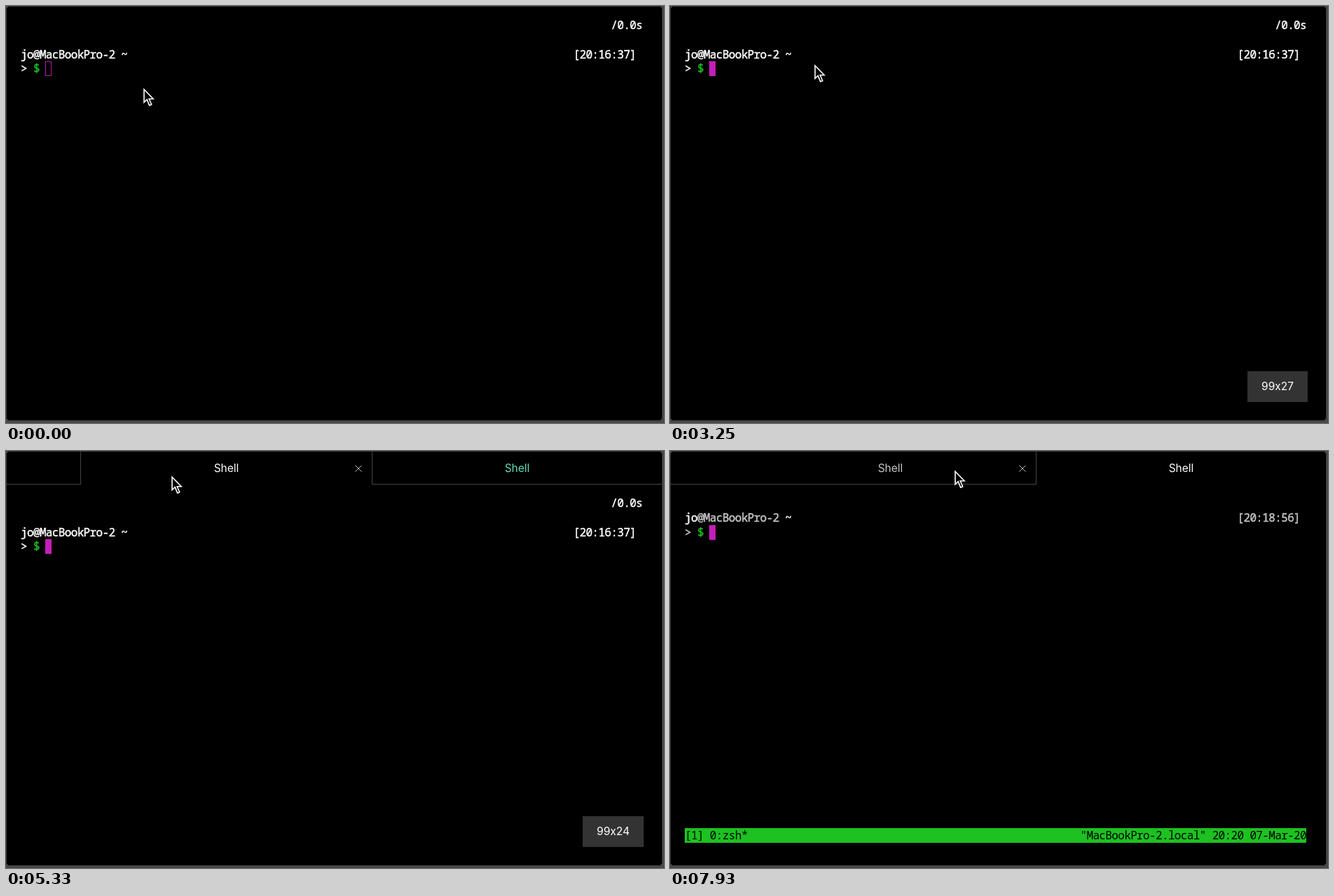
Write an HTML page that moves like this. It is 939 by 596 pixels and loops after 8000 ms.

```html
<!DOCTYPE html>
<html lang="en">
<head>
<meta charset="utf-8">
<title>Terminal tabs</title>
<style>
  html, body { margin: 0; width: 100%; height: 100%; overflow: hidden; background: #484848; }
  #stage { position: relative; width: 939px; height: 596px; overflow: hidden; }
  #stage div, #stage span, #stage svg { position: absolute; white-space: pre; }
  #window {
    left: 0; top: 0; width: 937px; height: 593px; box-sizing: border-box;
    background: #000; border: 1px solid #3c3c3c; border-radius: 5px;
  }
  .screen {
    left: 21px; top: 17px; width: 887px; height: 558px;
    font: 400 16px/20.75px "Noto Sans Mono", "DejaVu Sans Mono", monospace;
    letter-spacing: -.64px; -webkit-text-stroke: .45px currentColor; color: #fff;
  }
  .shifted { top: 64px; }
  .grey { color: #c7c7c7; }
  .green { color: #1dc121; }
  .block {
    width: 9px; height: 21px; box-sizing: border-box;
    border: 1px solid #c51eba; background: #c51eba;
  }
  .hollow { background: none; border-color: #b01ba6; }
  .status { left: 0; top: 475px; width: 887px; height: 21px; background: #1dc121; }
  .status span { color: #000; -webkit-text-stroke: 0; }

  #tabs { left: 0; top: 0; width: 937px; height: 48px; font: 15.5px/49px Inter, Roboto, sans-serif; }
  .label { top: 0; width: 415px; text-align: center; color: #fff; }
  .rule { background: #444; }
  .across { top: 47px; height: 1px; }
  .upright { top: 1px; width: 1px; height: 47px; }
  .close { top: 20px; width: 10px; height: 10px; stroke: #bbb; fill: none; }

  #notice {
    right: 29px; top: 522px; height: 44px; padding: 0 20px; background: #333; color: #fff;
    font: 15.5px/44px Inter, Roboto, sans-serif;
  }
  #pointer { left: 0; top: 0; width: 17px; height: 27px; overflow: visible; }
</style>
</head>
<body>
<div id="stage">
  <div id="window"></div>
  <div id="shell" class="screen"></div>
  <div id="tmux" class="screen shifted"><div class="status"></div></div>
  <div id="tabs">
    <div class="rule across" id="lineA" style="left:1px"></div>
    <div class="rule upright" id="edge" style="left:106px"></div>
    <div class="rule upright" style="left:522px"></div>
    <div class="rule across" id="lineB" style="left:522px;width:414px"></div>
    <div class="label" id="first" style="left:107px">Shell</div>
    <div class="label" id="second" style="left:522px">Shell</div>
    <svg class="close" id="closeA" style="left:498px"><path d="M.5.5l9 9m0-9l-9 9"/></svg>
    <svg class="close" id="closeB" style="left:912px"><path d="M.5.5l9 9m0-9l-9 9"/></svg>
  </div>
  <div id="notice"></div>
  <svg id="pointer"><path d="M1 1.2V19.6l4.2-3.9 3.5 8.4 3-1.3-3.5-8.1h5.9z"
    fill="#000" stroke="#fff" stroke-width="1.6"/></svg>
</div>
<script>
  const LOOP = 8000, STEP = 130, CELL = 8.96, ROW = 20.75;
  const $ = id => document.getElementById(id);

  function put(screen, col, row, text, style = "") {
    const el = document.createElement("span");
    el.textContent = text;
    el.className = style;
    el.style.left = col * CELL + "px";
    el.style.top = Math.round(row * ROW) + "px";
    screen.append(el);
    return el;
  }

  const shell = $("shell"), tmux = $("tmux");
  put(shell, 94, 0, "/0.0s");
  put(shell, 0, 2, "jo@MacBookPro-2 ~");
  put(shell, 88, 2, "[20:16:37]");
  put(shell, 0, 3, ">");
  put(shell, 2, 3, "$", "green");
  const block = put(shell, 3.93, 3, "", "block");

  put(tmux, 0, 1, "jo");
  put(tmux, 2, 1, "@MacBookPro-2", "grey");
  put(tmux, 16, 1, "~");
  put(tmux, 88, 1, "[20:18:56]", "grey");
  put(tmux, 0, 2, ">", "grey");
  put(tmux, 2, 2, "$", "green");
  put(tmux, 3.93, 2, "", "block");
  const status = tmux.querySelector(".status");
  put(status, 0, 0, "[1] 0:zsh*");
  put(status, 63, 0, '"MacBookPro-2.local" 20:20 07-Mar-20');

  // Pointer path: time, x, y
  const path = [
    [0, 196, 118], [1690, 196, 118], [2210, 186, 62], [2600, 177, 34], [2860, 181, 37],
    [3250, 206, 84], [3510, 216, 118], [4030, 216, 118], [4550, 222, 86], [4810, 227, 56],
    [4940, 228, 52], [5070, 231, 44], [5330, 236, 36], [5980, 236, 36], [6110, 385, 34],
    [6240, 538, 29], [6370, 600, 28], [6500, 628, 28], [7020, 633, 28], [7150, 622, 28],
    [7410, 518, 28], [7670, 424, 28], [7800, 409, 28], [7930, 406, 28]
  ];

  function pointerAt(t) {
    const i = path.findIndex(p => p[0] >= t);
    if (i < 1) return path[0].slice(1);
    const [t0, x0, y0] = path[i - 1], [t1, x1, y1] = path[i];
    const k = (t - t0) / (t1 - t0);
    return [x0 + (x1 - x0) * k, y0 + (y1 - y0) * k];
  }

  const within = (t, from, to) => t >= from && t < to;
  const show = (el, on) => { el.style.visibility = on ? "visible" : "hidden"; };
  const mix = (a, b, k) => `rgb(${a.map((v, i) => Math.round(v + (b[i] - v) * k))})`;

  function draw(t) {
    const tabs = within(t, 2340, 3250) || t >= 5070;
    const switched = t >= 7020;
    const [x, y] = pointerAt(t);

    $("tabs").style.display = tabs ? "" : "none";
    shell.style.display = switched ? "none" : "";
    tmux.style.display = switched ? "" : "none";
    shell.classList.toggle("shifted", tabs);
    block.classList.toggle("hollow", t < 910);

    $("lineA").style.width = (switched ? 522 : 106) + "px";
    show($("edge"), !switched);
    show($("lineB"), !switched);

    const fade = Math.min(1, Math.max(0, (t - 7020) / 260));
    $("first").style.color = mix([255, 255, 255], [199, 199, 199], fade);
    $("second").style.color = mix([104, 220, 190], [255, 255, 255], fade);
    const overSecond = within(t, 6370, 7410);
    show($("closeA"), !overSecond);
    show($("closeB"), overSecond);

    $("notice").textContent = tabs ? "99x24" : "99x27";
    show($("notice"), within(t, 2340, 4290) || within(t, 5070, 6110));
    $("pointer").style.transform = `translate(${x}px, ${y}px)`;
  }

  function tick() {
    draw(Math.floor(performance.now() % LOOP / STEP) * STEP);
    requestAnimationFrame(tick);
  }
  tick();
</script>
</body>
</html>
```
